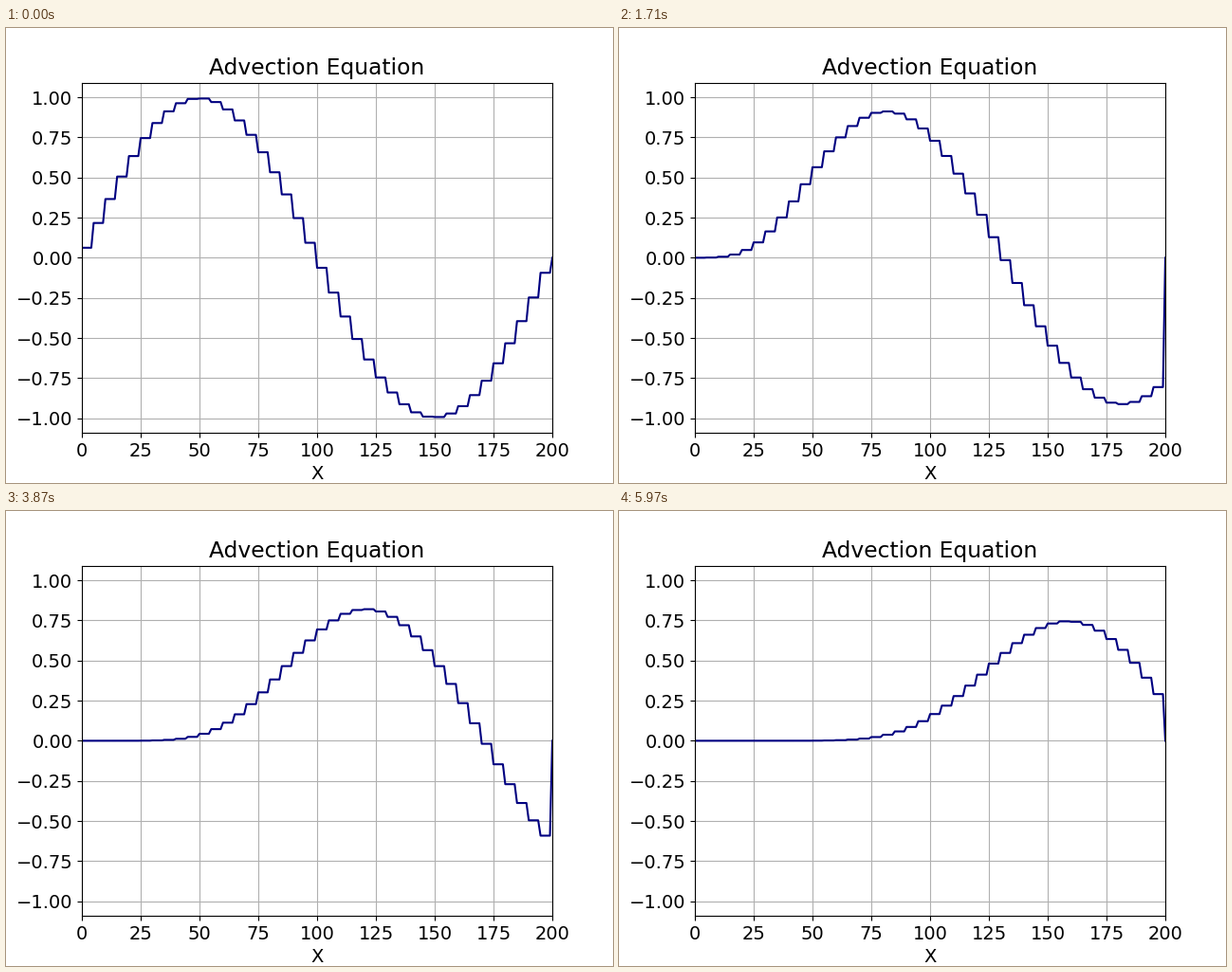
Write a matplotlib script that moves like this. It is 640x480 px and loops after 6000 ms.

```python
import matplotlib.pyplot as plt
import numpy as np
from matplotlib.animation import FuncAnimation

POINTS, WIDTH, STEPS = 200, 5, 200
CELLS = POINTS // WIDTH
CFL = 0.1
AMPLITUDE = 0.9945


def advance(cells):
    """One upwind sweep, updated in place with zero inflow on the left."""
    new = cells.copy()
    inflow = 0.0
    for j in range(CELLS):
        new[j] -= CFL * (new[j] - inflow)
        inflow = new[j]
    return new


def profile(cells):
    """Piecewise constant values on the grid, closed with a zero end point."""
    return np.append(np.repeat(cells, WIDTH), 0.0)


centers = np.arange(CELLS) * WIDTH + (WIDTH - 1) / 2
history = [AMPLITUDE * np.sin(2 * np.pi * centers / POINTS)]
for _ in range(STEPS - 1):
    history.append(advance(history[-1]))

plt.rcParams["font.family"] = "DejaVu Sans"
plt.rcParams["font.size"] = 14

fig, ax = plt.subplots(figsize=(6.4, 4.8), dpi=100)
x = np.arange(POINTS + 1)
line, = ax.plot(x, profile(history[0]), color="navy", lw=1.5)
limit = 1.1 * np.abs(history[0]).max()
ax.set(title="Advection Equation", xlabel="X", xlim=(0, POINTS), ylim=(-limit, limit))
ax.set_xticks(np.arange(0, POINTS + 1, 25))
ax.set_yticks(np.linspace(-1, 1, 9))
ax.grid(True)


def update(step):
    line.set_ydata(profile(history[step]))
    return line,


anim = FuncAnimation(fig, update, frames=STEPS, interval=30, repeat=True, repeat_delay=0)
plt.show()
```
